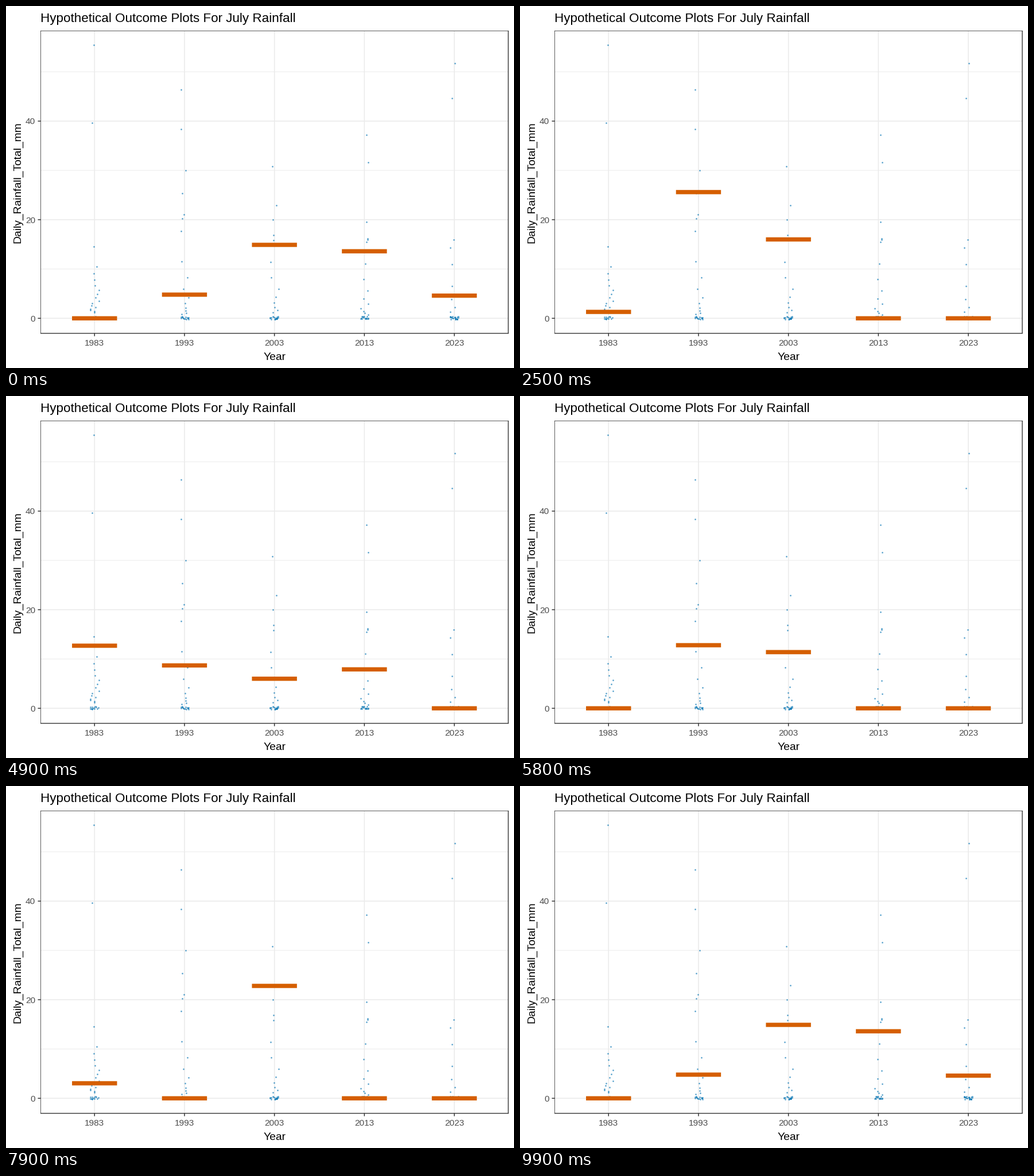
A matplotlib script that plays this animation: 885 by 632 pixels, repeating every 10 s.

```python
import matplotlib.pyplot as plt
import numpy as np
from matplotlib.animation import FuncAnimation
from matplotlib.patches import Rectangle

W, H, DPI = 885, 632, 100
PX = 72 / DPI
LEFT, RIGHT, TOP, BOTTOM = 60.5, 875, 43.5, 571.5
ZERO, SCALE = 545.25, 8.607
BAR_W, BAR_H = 78.4, 7.4
BLUE, ORANGE = "#0072B2", "#D55E00"
GRID, DARK, LABEL = "#EBEBEB", "#333333", "#4D4D4D"
DAYS, DRAWS, FRAMES = 31, 20, 100

# Per year: heaviest days (jitter px, mm), then a decaying tail (max, min, days)
RAIN = {
    1983: ([(-1.5, 55.5), (-4, 39.7), (-1.5, 14.6), (3.5, 10.5)],
           (9.1, 1.2, 14)),
    1993: ([(-6, 46.4), (-6, 38.4), (2, 30), (-4, 25.4), (-1, 21.1),
            (-4, 20.2), (-6, 17.7)], (11.5, .8, 9)),
    2003: ([(-4, 30.8), (3, 22.9), (-3, 20), (-2, 16.9)], (15.8, 1.2, 9)),
    2013: ([(4, 37.2), (7, 31.6), (4, 19.6), (6, 16.2), (6, 16)],
           (15.5, .75, 10)),
    2023: ([(1, 51.7), (-4, 44.6), (-1.5, 16), (-7, 14.3)], (11, 1.35, 5)),
}

# Rainy outcomes as {draw: mm}; every other draw is a dry day
OUTCOMES = {
    1983: {1: 6.15, 2: 3.05, 5: 1.3, 6: 6.15, 9: 14.9, 10: 10.5, 13: 6.15,
           16: 3.05, 17: 55.4},
    1993: {0: 4.8, 5: 25.6, 6: 25.6, 7: 20.1, 10: 17.4, 12: 25.6, 18: 38.6},
    2003: {0: 14.9, 2: 3.7, 5: 16, 6: 16, 9: 12, 11: 22.8, 13: 12, 15: 20,
           16: 22.8},
    2013: {0: 13.6, 8: 15.8, 9: 15.8},
    2023: {0: 4.6, 4: 7.8, 13: .2},
}


def col_x(i):
    return 154.25 + 156.7 * i


def row_y(mm):
    return ZERO - SCALE * mm


fig = plt.figure(figsize=(W / DPI, H / DPI), dpi=DPI, facecolor="white")
ax = fig.add_axes([0, 0, 1, 1])
ax.set_xlim(0, W)
ax.set_ylim(H, 0)
ax.axis("off")


def line(x0, y0, x1, y1, color, width, z):
    ax.plot([x0, x1], [y0, y1], color=color, lw=width * PX, zorder=z,
            solid_capstyle="butt", snap=False)


def text(x, y, s, size, color="black", ha="center", **kw):
    ax.text(x, y, s, fontsize=size * PX, color=color, ha=ha, va="baseline",
            family=["Liberation Sans", "DejaVu Sans"], **kw)


# Grid, ticks and tick labels
for mm in range(0, 60, 10):
    y = row_y(mm)
    major = mm in (0, 20, 40)
    line(LEFT, y, RIGHT, y, GRID, 1.6 if major else 1, 1)
    if major:
        line(55.5, y, LEFT, y, DARK, 1.5, 5)
        text(51, y + 5.5, str(mm), 15.4, LABEL, ha="right")
for i, year in enumerate(RAIN):
    x = col_x(i)
    line(x, TOP, x, BOTTOM, GRID, 1.6, 1)
    line(x, BOTTOM, x, 576.5, DARK, 1.5, 5)
    text(x, 592.6, str(year), 15.4, LABEL)

# Panel border
for x, width in ((LEFT, .8), (RIGHT, 1.4)):
    line(x, 43, x, 572, DARK, width, 5)
for y, width in ((TOP, .8), (BOTTOM, 1.4)):
    line(60, y, 875.5, y, DARK, width, 5)

text(60, 28.3, "Hypothetical Outcome Plots For July Rainfall", 22.4,
     ha="left")
text(467.7, 618, "Year", 19.3)
text(25, 307.7, "Daily_Rainfall_Total_mm", 19.3, rotation=90,
     rotation_mode="anchor")

# Daily totals: heavy days, lighter tail, dry days scattered around zero
rng = np.random.default_rng(7)
for i, (heavy, tail) in enumerate(RAIN.values()):
    dry = DAYS - len(heavy) - tail[2]
    light = np.concatenate([np.geomspace(*tail), rng.uniform(-.26, .4, dry)])
    jitter = rng.uniform(-7.5, 7.5, len(light))
    dx, mm = np.vstack([heavy, np.column_stack([jitter, light])]).T
    ax.scatter(col_x(i) + dx, row_y(mm), s=(2.7 * PX) ** 2, c=BLUE,
               alpha=.65, linewidths=0, zorder=3)

bars = [ax.add_patch(Rectangle((col_x(i) - BAR_W / 2, 0), BAR_W, BAR_H,
                               fc=ORANGE, lw=0, zorder=4, snap=False))
        for i in range(len(RAIN))]

# One halfway step leads from each draw to the next; the second half of the
# loop starts one step early
TWEENS = [5 * k + 4 - (k >= DRAWS // 2) for k in range(DRAWS)]


def update(frame):
    now = sum(t < frame for t in TWEENS) % DRAWS
    after = (now + 1) % DRAWS if frame in TWEENS else now
    for bar, rainy in zip(bars, OUTCOMES.values()):
        mm = (rainy.get(now, 0) + rainy.get(after, 0)) / 2
        bar.set_y(row_y(mm) - BAR_H / 2)
    return bars


anim = FuncAnimation(fig, update, frames=FRAMES, interval=100, repeat=True,
                     repeat_delay=0, blit=False)
plt.show()
```
